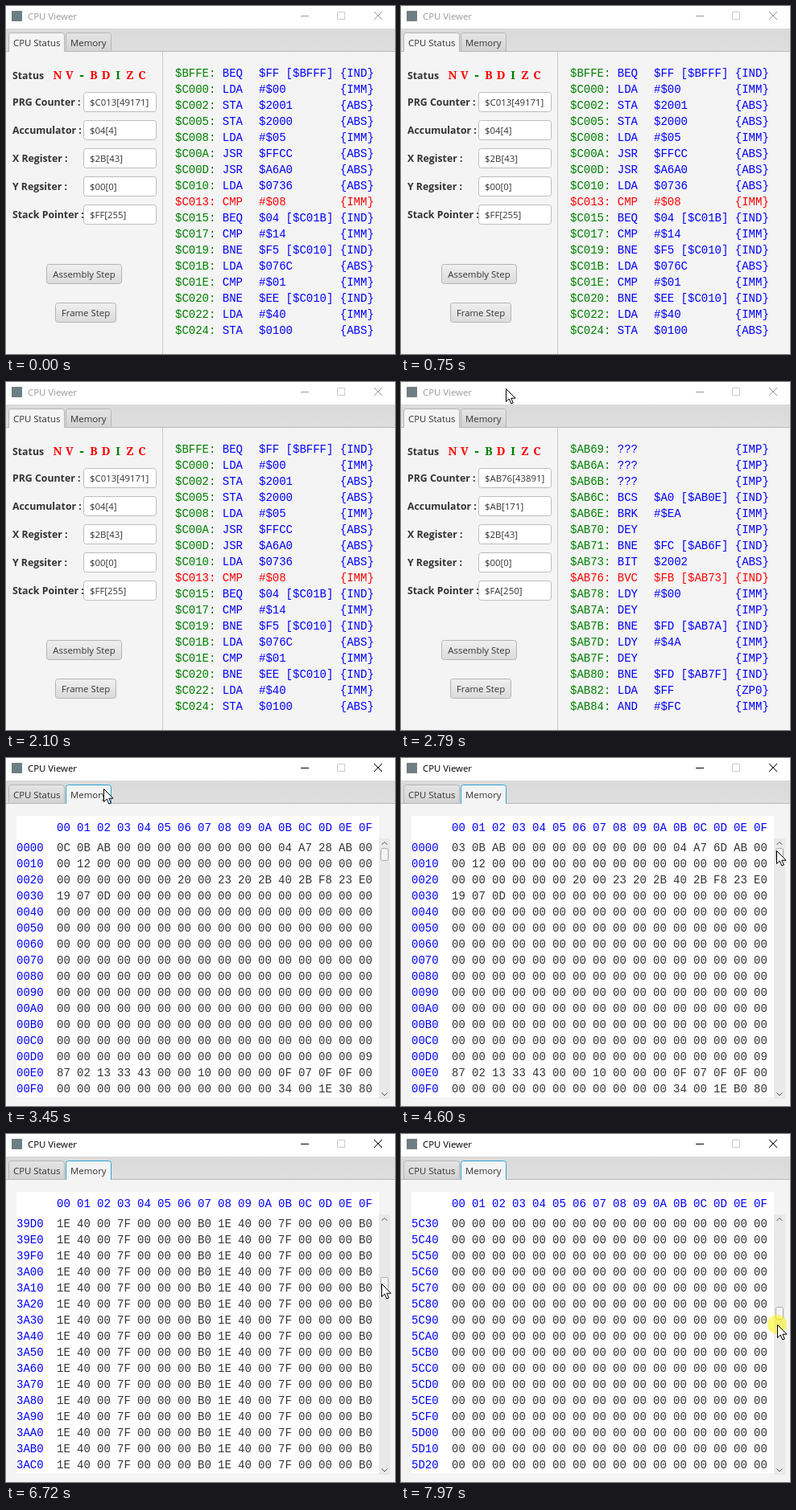
Write an HTML page with a canvas that moves like this. It is 483 by 433 pixels and loops after 8000 ms.

```html
<!DOCTYPE html>
<html lang="en">
<head>
<meta charset="utf-8">
<title>CPU Viewer</title>
<style>
html, body { margin: 0; width: 100%; height: 100%; overflow: hidden; background: #f4f4f4; }
canvas { display: block; }
</style>
</head>
<body>
<canvas id="stage" width="483" height="433"></canvas>
<script>
const ctx = document.getElementById('stage').getContext('2d');
const LOOP = 8000;
const UI = '11.4px "Open Sans", sans-serif';
const LABEL = 'bold 12.3px "Open Sans", sans-serif';
const MONO = '14px "Liberation Mono", monospace';
const FLAG = 'bold 14px "Noto Serif", serif';
const DASH = 'bold 16px "Liberation Mono", monospace';

// Bursts of screen updates: start, end, number of updates
const BURSTS = [
  [30, 800, 17], [900, 1690, 15], [1720, 2510, 16], [2560, 3350, 18], [3400, 4140, 16],
  [4220, 5010, 18], [5060, 5850, 17], [5900, 6410, 12], [6720, 7510, 16], [7560, 7970, 10]
];
// time, x, y
const POINTER = [
  [2560, 150, -20], [2790, 130, 8], [2900, 130, 8], [3200, 102, 44], [3400, 102, 44],
  [3750, 235, 2], [4140, 415, 110], [4400, 472, 118], [4500, 466, 115], [5060, 466, 115],
  [5850, 467, 171], [6410, 466, 186], [7510, 466, 186], [7970, 467, 237]
];
// time, first memory row, top of the thumb
const SCROLL = [
  [5060, 0, 112], [5850, 535, 156], [6410, 925, 178], [7510, 925, 178], [7970, 1475, 215]
];
const PRESSES = [[2850, 2950], [3200, 3300], [5060, 6400], [7540, LOOP]];
const ACTIVE_AT = 2900, MEMORY_AT = 3240;

const MAIN_LOOP = [
  'BFFD ??? IMP', 'BFFE BEQ $FF [$BFFF] IND', 'C000 LDA #$00 IMM', 'C002 STA $2001 ABS',
  'C005 STA $2000 ABS', 'C008 LDA #$05 IMM', 'C00A JSR $FFCC ABS', 'C00D JSR $A6A0 ABS',
  'C010 LDA $0736 ABS', 'C013 CMP #$08 IMM', 'C015 BEQ $04 [$C01B] IND', 'C017 CMP #$14 IMM',
  'C019 BNE $F5 [$C010] IND', 'C01B LDA $076C ABS', 'C01E CMP #$01 IMM',
  'C020 BNE $EE [$C010] IND', 'C022 LDA #$40 IMM', 'C024 STA $0100 ABS',
  'C027 STA $0101 ABS', 'C02A JSR $C0F2 ABS', 'C02D LDA $0770 ABS'
];
const WAIT_LOOP = [
  'AB68 ??? IMP', 'AB69 ??? IMP', 'AB6A ??? IMP', 'AB6B ??? IMP', 'AB6C BCS $A0 [$AB0E] IND',
  'AB6E BRK #$EA IMM', 'AB70 DEY IMP', 'AB71 BNE $FC [$AB6F] IND', 'AB73 BIT $2002 ABS',
  'AB76 BVC $FB [$AB73] IND', 'AB78 LDY #$00 IMM', 'AB7A DEY IMP', 'AB7B BNE $FD [$AB7A] IND',
  'AB7D LDY #$4A IMM', 'AB7F DEY IMP', 'AB80 BNE $FD [$AB7F] IND', 'AB82 LDA $FF ZP0',
  'AB84 AND #$FC IMM'
];
const VISITED = ['C013', 'AB76', 'C015', 'C019', 'AB73', 'C010', 'AB76', 'C017'];

// Non-zero runs of page zero, by start address
const ZERO_PAGE = {
  0x00: '030BAB', 0x0B: '04A76DAB', 0x11: '12', 0x26: '200023202B402BF823E0',
  0x30: '19070D', 0xDF: '09', 0xE0: '8702133343000010', 0xEB: '0F070F0F', 0xFB: '34001EB080'
};
const PORTS = ['1E00007F00000032', '1E40007F000000B0', '0680007F00000000'];
const ram = new Uint8Array(256);
for (const [start, run] of Object.entries(ZERO_PAGE))
  run.match(/../g).forEach((b, i) => ram[+start + i] = parseInt(b, 16));

const hex = (v, n) => v.toString(16).toUpperCase().padStart(n, '0');

function text(s, x, y, font, color, align = 'left') {
  ctx.font = font;
  ctx.fillStyle = color;
  ctx.textAlign = align;
  ctx.fillText(s, x, y);
}
function rect(x, y, w, h, color) {
  ctx.fillStyle = color;
  ctx.fillRect(x, y, w, h);
}
function line(color, ...pts) {
  ctx.beginPath();
  for (let i = 0; i < pts.length; i += 2) ctx.lineTo(pts[i], pts[i + 1]);
  ctx.strokeStyle = color;
  ctx.stroke();
}
function box(x, y, w, h, radius, fill, border) {
  ctx.beginPath();
  ctx.roundRect(x + .5, y + .5, w - 1, h - 1, radius);
  ctx.fillStyle = fill;
  ctx.fill();
  ctx.strokeStyle = border;
  ctx.stroke();
}
function shade(y0, y1, top, bottom) {
  const g = ctx.createLinearGradient(0, y0, 0, y1);
  g.addColorStop(0, top);
  g.addColorStop(1, bottom);
  return g;
}
function along(keys, t) {
  const i = keys.findIndex(k => k[0] > t);
  if (i === 0) return keys[0].slice(1);
  if (i < 0) return keys.at(-1).slice(1);
  const [a, b] = [keys[i - 1], keys[i]];
  const p = (t - a[0]) / (b[0] - a[0]);
  return [1, 2].map(j => a[j] + (b[j] - a[j]) * p);
}
// Latest screen update: its time and running number
function lastUpdate(t) {
  let time = 0, count = 0, before = 0;
  for (const [start, end, n] of BURSTS) {
    if (t < start) break;
    const gap = (end - start) / (n - 1);
    const i = Math.min(n - 1, Math.floor((t - start) / gap + .25));
    time = start + i * gap;
    count = before + i + 1;
    before += n;
  }
  return { time, count };
}

function drawWindow(active, memory) {
  const ink = active ? '#000' : '#999';
  rect(0, 0, 483, 433, '#f4f4f4');
  rect(0, 0, 483, 28, '#fff');
  rect(7, 6, 13, 13, '#6d7f84');
  text('CPU Viewer', 27, 17, UI, ink);
  line(ink, 366, 12.5, 376, 12.5);
  ctx.strokeStyle = '#ccc';
  ctx.strokeRect(411.5, 7.5, 9, 9);
  line(ink, 457, 7, 467, 17);
  line(ink, 467, 7, 457, 17);

  rect(0, 28, 483, 29, shade(28, 57, '#dadada', '#dedede'));
  rect(0, 56, 483, 1, '#b8b8b8');
  drawTab('CPU Status', 3, 70, !memory, '#b5b5b5');
  drawTab('Memory', 74, 57, memory, memory ? '#2aa5cf' : '#b5b5b5');
}
function drawTab(name, x, w, selected, border) {
  const fill = selected ? '#f4f4f4' : shade(34, 57, '#e4e4e4', '#d2d2d2');
  box(x, 33, w, 24, [3, 3, 0, 0], fill, border);
  if (selected) rect(x + 1, 56, w - 2, 2, '#f4f4f4');
  text(name, x + 6, 50, UI, '#333');
}

function drawStatus(count) {
  const pc = VISITED[count % 8];
  const waiting = pc[0] === 'A';
  const lagging = waiting ? (pc === 'AB73' ? 'AB76' : 'AB73') : pc;
  const isSet = waiting ? '-BI' : pc === 'C013' ? '-I' : 'N-I';
  const reg = v => `$${hex(v, 2)}[${v}]`;
  const fields = [
    ['PRG Counter :', `$${pc}[${parseInt(lagging, 16)}]`],
    ['Accumulator :', reg(waiting ? 0xAB : 4)],
    ['X Register :', reg(0x2B)],
    ['Y Regsiter :', reg(0)],
    ['Stack Pointer :', reg(waiting ? 0xFA : 0xFF)]
  ];

  rect(194, 57, 1, 376, '#c8c8c8');
  text('Status', 8, 91, LABEL, '#333');
  [...'NV-BDIZC'].forEach((f, i) => text(f, 64 + i * 15, 91, f === '-' ? DASH : FLAG,
    isSet.includes(f) ? '#008000' : '#f00', 'center'));
  fields.forEach(([label, value], i) => {
    const y = 107 + i * 35;
    text(label, 8, y + 17, LABEL, '#333');
    box(96, y, 91, 25, 3, '#fff', '#bdbdbd');
    text(value, 104, y + 17, UI, '#333');
  });
  drawButton('Assembly Step', 50, 321, 94);
  drawButton('Frame Step', 61, 369, 76);

  const code = waiting ? WAIT_LOOP : MAIN_LOOP;
  const first = code.findIndex(s => s.startsWith(pc)) - 8;
  code.slice(first, first + 17).forEach((s, i) => {
    const y = 88 + i * 20, current = i === 8;
    const ink = current ? '#f00' : '#00f';
    text(`$${s.slice(0, 4)}:`, 210, y, MONO, current ? ink : '#008000');
    text(s.slice(5, 8), 268.8, y, MONO, ink);
    text(s.slice(9, -4), 314, y, MONO, ink);
    text(`{${s.slice(-3)}}`, 414.8, y, MONO, ink);
  });
}
function drawButton(name, x, y, w) {
  box(x, y, w, 25, 3, shade(y, y + 25, '#f0f0f0', '#dadada'), '#b4b4b4');
  text(name, x + w / 2, y + 17, UI, '#333', 'center');
}

function memoryByte(addr, count) {
  if (addr >= 0x4000) return '00';
  if (addr >= 0x2000) return PORTS[count % 3].substr(addr % 8 * 2, 2);
  const a = addr % 0x800, step = count - 91 + 256;
  if (a > 255) return '00';
  if (a === 0x00) return hex((3 + step) % 16, 2);
  if (a === 0x0D) return hex((0x6D + step * 3) % 256, 2);
  if (a === 0xFE) return step % 2 ? '30' : 'B0';
  return hex(ram[a], 2);
}
function drawMemory(time, count) {
  const [row, thumb] = along(SCROLL, time);
  rect(13, 72, 450, 350, '#fff');
  for (let c = 0; c < 16; c++) text(hex(c, 2), 63 + c * 25, 91, MONO, '#00f');
  for (let r = 0; r < 16; r++) {
    const addr = (Math.round(row) + r) * 16, y = 116 + r * 20;
    text(hex(addr, 4), 13, y, MONO, '#00f');
    for (let c = 0; c < 16; c++)
      text(memoryByte(addr + c, count), 63 + c * 25, y, MONO, '#333');
  }
  rect(463, 100, 14, 324, '#e9e9e9');
  line('#555', 466.5, 108, 470, 104.5, 473.5, 108);
  line('#555', 466.5, 416.5, 470, 420, 473.5, 416.5);
  box(465, Math.round(thumb), 10, 16, 2, '#f3f3f3', '#aaa');
}

function drawPointer(time) {
  const [x, y] = along(POINTER, time).map(Math.round);
  if (PRESSES.some(([from, to]) => time >= from && time < to)) {
    ctx.beginPath();
    ctx.arc(x, y, 12, 0, 7);
    ctx.fillStyle = 'rgba(255, 245, 30, .6)';
    ctx.fill();
  }
  const arrow = new Path2D('M.5 .5V16.5L4.2 13 6.8 19 9.3 18 6.8 12.2H12Z');
  ctx.save();
  ctx.translate(x, y);
  ctx.fillStyle = '#fff';
  ctx.fill(arrow);
  ctx.strokeStyle = '#000';
  ctx.stroke(arrow);
  ctx.restore();
}

function draw(now) {
  const { time, count } = lastUpdate(now % LOOP);
  const memory = time >= MEMORY_AT;
  ctx.lineWidth = 1;
  drawWindow(time >= ACTIVE_AT, memory);
  if (memory) drawMemory(time, count);
  else drawStatus(count);
  if (time >= POINTER[0][0]) drawPointer(time);
  requestAnimationFrame(draw);
}
requestAnimationFrame(draw);
</script>
</body>
</html>
```
